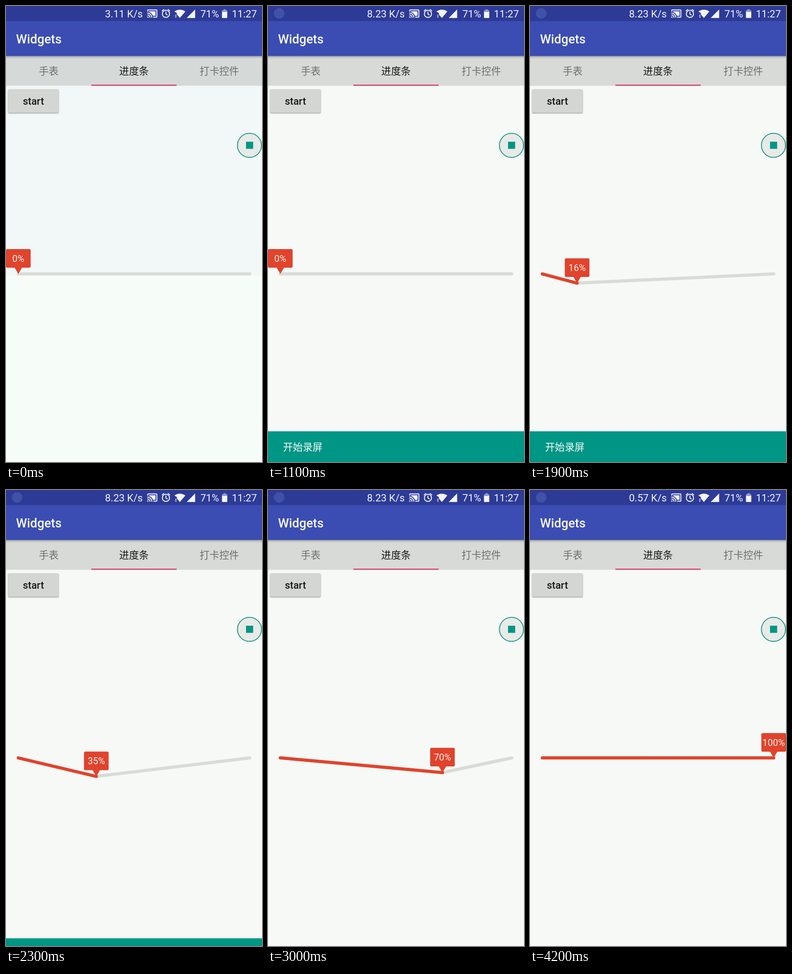
Animation of 561x998 px, one loop 4300 ms. Source, as an HTML page:

```html
<!DOCTYPE html>
<html lang="zh-CN">
<head>
<meta charset="utf-8">
<title>Widgets</title>
<style>
  html, body { margin: 0; width: 100%; height: 100%; overflow: hidden; background: #f7f9f7; }
  svg { display: block; width: 100%; height: 100%; }
  text { font-family: Roboto, "Noto Sans CJK SC", "Noto Sans CJK", sans-serif; }
  .mid { text-anchor: middle; }
  .status { font-size: 22px; fill: #f4f5fb; }
  .tab { font-size: 21.6px; fill: #6c6e6c; text-anchor: middle; }
  .bar { fill: none; stroke-width: 7; stroke-linecap: round; stroke-linejoin: round; }
</style>
</head>
<body>
<svg viewBox="0 0 561 998" preserveAspectRatio="none">
  <defs>
    <linearGradient id="shade" x1="0" y1="0" x2="0" y2="1">
      <stop offset="0" stop-color="#000" stop-opacity=".34"/>
      <stop offset=".4" stop-color="#000" stop-opacity=".12"/>
      <stop offset="1" stop-color="#000" stop-opacity="0"/>
    </linearGradient>
    <filter id="soft" x="-10%" y="-10%" width="120%" height="130%">
      <feGaussianBlur stdDeviation="1.1"/>
    </filter>
  </defs>

  <rect id="upper" width="561" height="590"/>
  <rect id="lower" y="590" width="561" height="408"/>

  <rect id="tabs" y="109" width="561" height="65.6"/>
  <rect y="109" width="561" height="7" fill="url(#shade)"/>
  <rect x="187" y="172" width="187" height="2.7" fill="#db4676"/>
  <text class="tab" x="93.5" y="150">手表</text>
  <text class="tab" x="280.5" y="150" style="fill:#161816">进度条</text>
  <text class="tab" x="467.5" y="150">打卡控件</text>

  <rect y="32" width="561" height="77.2" fill="#3b4db2"/>
  <rect width="561" height="33" fill="#2d3b97"/>
  <text x="22" y="81.5" font-size="27.3" font-weight="500" fill="#f7f8fc">Widgets</text>

  <circle id="badge" cx="24.5" cy="16.2" r="11.5" fill="#4052a6"/>
  <text id="speed" class="status" x="217" y="25"></text>
  <text class="status" x="426" y="25">71%</text>
  <text class="status" x="495" y="25">11:27</text>
  <g fill="#f4f5fb">
    <path transform="translate(308.6 4.6)" d="M1 18v3h3c0-1.66-1.34-3-3-3zm0-4v2c2.76 0 5 2.24 5 5h2c0-3.87-3.13-7-7-7zm18-7H5v1.63c3.96 1.28 7.09 4.41 8.37 8.37H19V7zM1 10v2c4.97 0 9 4.03 9 9h2c0-6.08-4.93-11-11-11zm20-7H3c-1.1 0-2 .9-2 2v3h2V5h18v14h-7v2h7c1.1 0 2-.9 2-2V5c0-1.1-.9-2-2-2z"/>
    <path d="M369 12Q381 4 393 12L381 26.2L374.5 18.5V15.5Z"/>
    <path d="M370 21.5h4.4l-2.2-3zM370 23h4.4l-2.2 3z" opacity=".85"/>
    <path d="M396 26.2H414.5V7.6Z"/>
    <path d="M473.3 12.8V9.3H476.5V7H481.7V9.3H484.9V12.8Z" opacity=".5"/>
    <path d="M473.3 12.8H484.9V25Q484.9 26.2 483.7 26.2H474.5Q473.3 26.2 473.3 25Z"/>
  </g>
  <g fill="none" stroke="#f4f5fb" stroke-width="2">
    <circle cx="350.5" cy="17.2" r="7.9"/>
    <path d="M350.5 12.3V17.6L354.3 20M341.5 11.2L346.3 7.2M359.5 11.2L354.7 7.2"/>
  </g>

  <rect x="4.5" y="183.2" width="111" height="52" rx="2.5" fill="#000" opacity=".32" filter="url(#soft)"/>
  <rect x="5" y="182" width="110" height="51.5" rx="2.5" fill="#d4d6d3"/>
  <text x="37" y="216" font-size="22" font-weight="500" fill="#151715">start</text>

  <path id="rest" class="bar" stroke="#d9dbd8"/>
  <path id="done" class="bar" stroke="#e1432c"/>
  <g id="bubble">
    <path d="M-24 -54.3H24Q27 -54.3 27 -51.3V-16.5Q27 -13.5 24 -13.5H8L0 0L-8 -13.5H-24Q-27 -13.5 -27 -16.5V-51.3Q-27 -54.3 -24 -54.3Z" fill="#e1432c"/>
    <text id="label" class="mid" y="-26.7" font-size="20.4" fill="#fdf3f0"></text>
  </g>

  <circle cx="533.6" cy="305" r="26.4" fill="#e8eae7" stroke="#0b9382" stroke-width="1.8"/>
  <rect x="526" y="297" width="15.6" height="15.6" fill="#009685"/>

  <g id="snack">
    <rect y="930.8" width="561" height="68" fill="#009685"/>
    <text x="33" y="973" font-size="21.6" fill="#f4fbfa">开始录屏</text>
  </g>
</svg>
<script>
  const LOOP = 4300, STEP = 100;
  const LEFT = 27, SPAN = 507, BASE = 586.3, SAG = 107.5;
  const BEGIN = 1180, MIDDLE = 2600, END = 4100;
  const $ = id => document.getElementById(id);
  const clamp = v => Math.max(0, Math.min(1, v));
  const smooth = v => v * v * (3 - 2 * v);
  const set = (id, name, value) => $(id).setAttribute(name, value);

  // Cosine ease with a slightly longer second half
  function progress(t) {
    const u = t < MIDDLE
      ? (t - BEGIN) / (MIDDLE - BEGIN) / 2
      : 0.5 + (t - MIDDLE) / (END + 20 - MIDDLE) / 2;
    return t >= END ? 1 : (1 - Math.cos(Math.PI * clamp(u))) / 2;
  }

  function drawBar(t) {
    const p = progress(t);
    const lead = p < 0.5 ? 0.18 * p * (1 - 2 * p) : 0;
    const x = LEFT + SPAN * p;
    const y = BASE + SAG * Math.min(p + 2 * lead, 1 - p);
    set("rest", "d", `M${x} ${y}L${LEFT + SPAN} ${BASE}`);
    set("done", "d", p > 0 ? `M${LEFT} ${BASE}L${x} ${y}` : "");
    set("bubble", "transform", `translate(${x} ${y})`);
    $("label").textContent = Math.floor(100 * (p + lead) + 1e-6) + "%";
  }

  function drawSnack(t) {
    const enter = 1 - (1 - clamp(t / 300)) ** 3;
    const leave = smooth(clamp((t - 2120) / 270));
    set("snack", "transform", `translate(0 ${68 * (1 - enter + leave)})`);
    set("snack", "opacity", clamp(0.8 + (t - 300) / 1500));
  }

  function drawTones(t) {
    const [upper, lower, tabs] =
      t < 200 ? ["#f2f8f8", "#f6fcf8", "#d5dad9"] :
      t < 600 ? ["#f6f8f9", "#f5faf6", "#d7d9d8"] :
                ["#f7f9f7", "#f7f9f7", "#d8dad7"];
    set("upper", "fill", upper);
    set("lower", "fill", lower);
    set("tabs", "fill", tabs);
  }

  function draw(now) {
    const t = Math.floor((now % LOOP) / STEP) * STEP;
    drawTones(t);
    drawBar(t);
    drawSnack(t);
    set("badge", "visibility", t < 100 ? "hidden" : "visible");
    $("speed").textContent = (t < 1100 ? "3.11" : t < 4100 ? "8.23" : "0.57") + " K/s";
  }

  let start;
  function tick(now) {
    start ??= now;
    draw(now - start);
    requestAnimationFrame(tick);
  }
  draw(0);
  requestAnimationFrame(tick);
</script>
</body>
</html>
```
